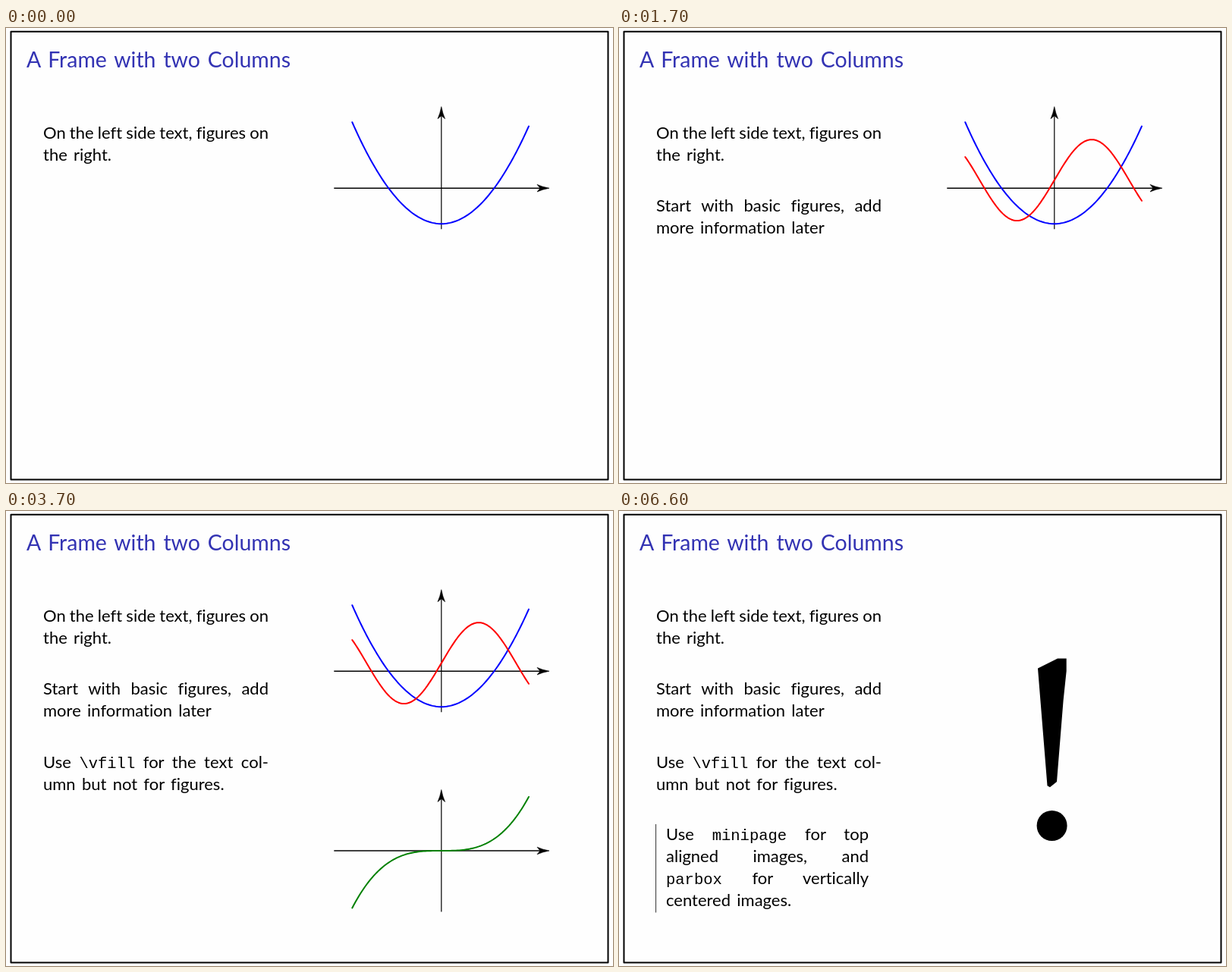
Animation of 800 by 600 pixels, one loop 8000 ms. Source, as an HTML page:

```html
<!DOCTYPE html>
<html lang="en">
<head>
<meta charset="utf-8">
<title>Two columns</title>
<style>
  html, body { margin: 0; width: 100%; height: 100%; overflow: hidden; background: #fefefe; }
  svg { position: absolute; left: 0; top: 0; }
  .line {
    position: absolute; white-space: nowrap; color: #000;
    font: 22px/30px Lato, "Open Sans", sans-serif;
    font-variant-ligatures: none; word-spacing: .12em;
  }
  .title { color: #3333b3; font-size: 28.5px; word-spacing: .09em; }
  .full { white-space: normal; text-align-last: justify; word-spacing: -.1em; }
  code { font: 20.5px/0 "Liberation Mono", monospace; }
  .curve { fill: none; stroke-width: 2; stroke-linecap: round; stroke-linejoin: round; }
</style>
</head>
<body>
<svg width="800" height="600" viewBox="0 0 800 600">
  <defs>
    <path id="head" d="M0 0Q-9 -1.6 -16 -4.8L-12 0L-16 4.8Q-9 1.6 0 0Z"/>
  </defs>
  <rect x="6.5" y="4.8" width="787" height="590.7" fill="none" stroke="#000" stroke-width="2" stroke-linejoin="round"/>
  <g id="upper" transform="translate(573.8 211.2)"></g>
  <g id="lower" transform="translate(573.8 448)"></g>
  <g id="mark">
    <path d="M552 207.5L578 194.5H589.7V211L585.6 250L577 357L568 364.3L564.5 362.3Z"/>
    <circle cx="570.6" cy="415" r="20"/>
  </g>
  <path id="bar" d="M48.6 413V529.5" stroke="#333" stroke-width="1"/>
</svg>
<script>
const LOOP = 8000, UNIT = 23.5;
const STARTS = [0, 500, 2500, 4500];
const $ = id => document.getElementById(id);
const parts = [];

// Show an element from step `from` up to, not including, step `to`.
function during(el, from, to = STARTS.length) {
  parts.push({ el, from, to });
}

function axes(parent, top, bottom) {
  parent.innerHTML = `<g stroke="#000" stroke-width=".6">
    <path d="M-141.5 0H132" stroke-width="1.5"/>
    <path d="M0 ${bottom}V${top + 10}" stroke-width="1.2"/>
    <use href="#head" x="142.2"/>
    <use href="#head" transform="translate(0 ${top}) rotate(-90)"/>
  </g>`;
}

function curve(parent, color, fn) {
  const points = [];
  for (let i = -50; i <= 49; i++) {
    const x = i / 10;
    points.push(`${(x * UNIT).toFixed(2)},${(-fn(x) * UNIT).toFixed(2)}`);
  }
  const el = document.createElementNS("http://www.w3.org/2000/svg", "polyline");
  el.setAttribute("class", "curve");
  el.setAttribute("stroke", color);
  el.setAttribute("points", points.join(" "));
  parent.append(el);
  return el;
}

// A line of text on a baseline; `width` justifies it to the column.
function line(html, x, base, step, width, kind = "") {
  const el = document.createElement("div");
  el.className = `line ${kind} ${width ? "full" : ""}`;
  el.innerHTML = html;
  const size = kind === "title" ? 28.5 : 22;
  el.style.left = x + "px";
  el.style.top = Math.round(base - 15 - 0.387 * size) + "px";
  if (width) el.style.width = width + "px";
  document.body.append(el);
  during(el, step);
}

line("A Frame with two Columns", 27, 52, 0, 0, "title");
[
  ["On the left side text, figures on", 49, 147, 0, 297],
  ["the right.", 49, 176, 0],
  ["Start with basic figures, add", 49, 243, 1, 297],
  ["more information later", 49, 272, 1],
  ["Use <code>\\vfill</code> for the text col-", 49, 340, 2, 297],
  ["umn but not for figures.", 49, 369, 2],
  ["Use <code>minipage</code> for top", 62, 435, 3, 267],
  ["aligned images, and", 62, 464, 3, 267],
  ["<code>parbox</code> for vertically", 62, 493, 3, 267],
  ["centered images.", 62, 522, 3],
].forEach(row => line(...row));

axes($("upper"), -107.5, 54);
axes($("lower"), -80.5, 80.5);
curve($("upper"), "#00f", x => 0.228 * x * x - 2);
const wave = curve($("upper"), "#f00", x => 2.275 * Math.sin(0.75 * x) + 0.45);
curve($("lower"), "#008000", x => 0.0257 * x ** 3);

during($("upper"), 0, 3);
during(wave, 1, 3);
during($("lower"), 2, 3);
during($("mark"), 3);
during($("bar"), 3);

let shown = -1;
function draw(now) {
  const t = now % LOOP;
  const step = STARTS.filter(s => s <= t).length - 1;
  if (step === shown) return;
  shown = step;
  for (const { el, from, to } of parts) {
    el.style.display = step >= from && step < to ? "" : "none";
  }
}

const start = performance.now();
function tick() {
  draw(performance.now() - start);
  requestAnimationFrame(tick);
}
tick();
</script>
</body>
</html>
```
